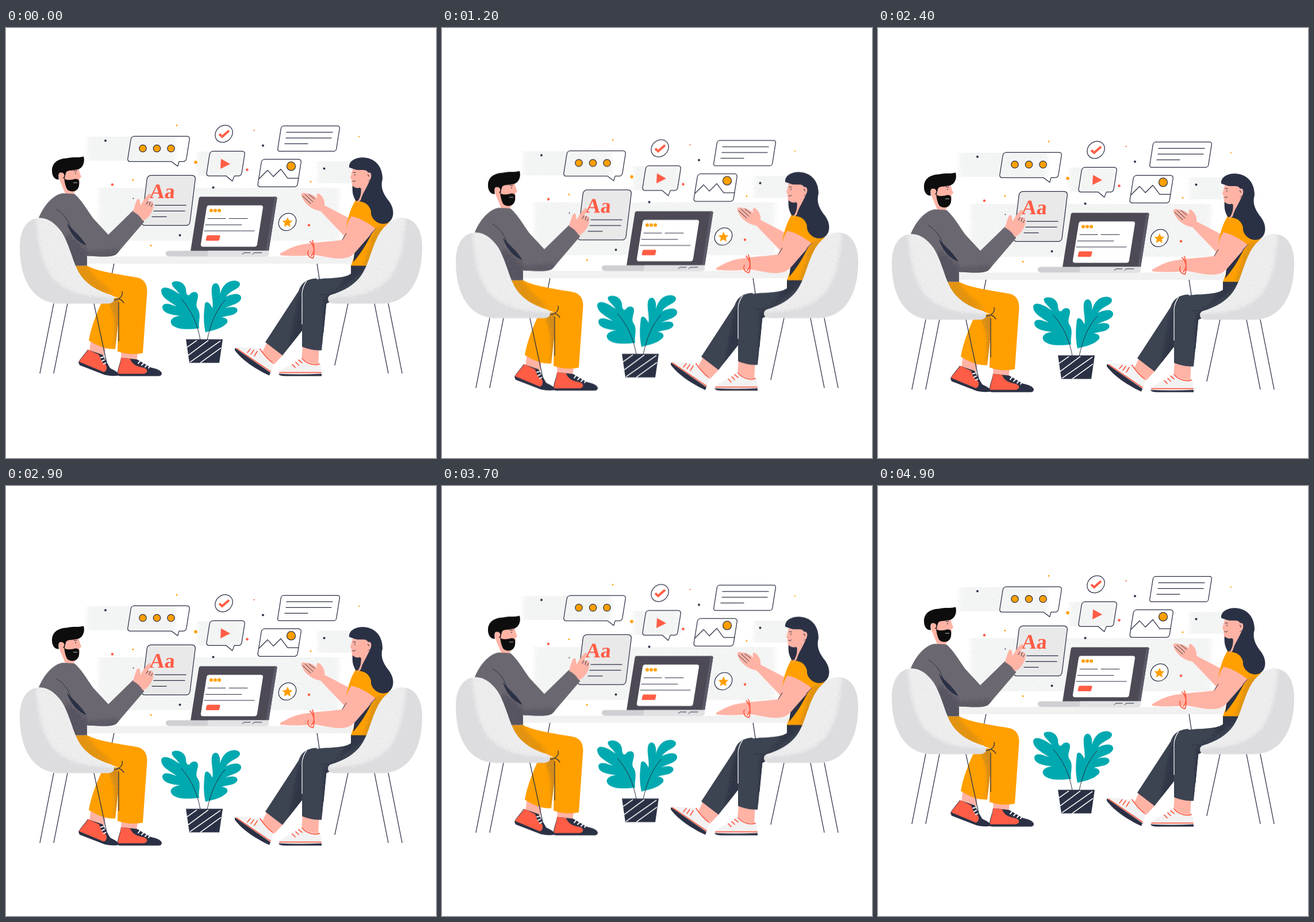
Recreate the animation shown at these times as an HTML page without scripts. Size 748 px wide and 748 px high, loop 5000 ms.

```html
<!DOCTYPE html>
<html lang="en">
<head>
<meta charset="utf-8">
<title>Meeting at the desk</title>
<style>
  @property --tick { syntax: "<number>"; inherits: false; initial-value: 0; }
  html, body { margin: 0; width: 100%; height: 100%; overflow: hidden; background: #fff; }
  /* sine float, 10 poses a second, 6 s wave cut at 5 s */
  #scene {
    display: block; width: 100%; height: 100%; will-change: transform;
    transform: translateY(calc(8.4px + 22px * cos((var(--tick) - 19) * 6deg)));
    animation: float 5s steps(50) -10ms infinite;
  }
  @keyframes float { to { --tick: 50; } }
  .line { fill: none; stroke: #2b3145; stroke-width: 1.25; stroke-linecap: round; stroke-linejoin: round; }
  .thin { stroke-width: 1; }
  .navy { fill: #2b3145; }
  .orange { fill: #ff9f00; }
  .red { fill: #ff5d45; }
  .skin { fill: #ffb3a5; }
  .teal { fill: #00a9b0; }
  .panel { fill: #f2f3f3; filter: url(#fade); }
  .grain { filter: url(#grain); }
  .lace { fill: none; stroke: #fff; stroke-width: 2; stroke-linecap: round; }
  .trim { fill: none; stroke: #ff5d45; stroke-width: 1.8; stroke-linecap: round; }
  .black { fill: #0d0d0d; }
  text { font: bold 36px "Liberation Serif", "Noto Serif", serif; }
</style>
</head>
<body>
<svg id="scene" viewBox="0 0 748 748">
  <defs>
    <filter id="grain" color-interpolation-filters="sRGB">
      <feGaussianBlur in="SourceAlpha" stdDeviation="7" result="soft"/>
      <feTurbulence type="fractalNoise" baseFrequency=".75" numOctaves="2" seed="4" result="noise"/>
      <feComposite in="soft" in2="noise" operator="arithmetic" k2="5" k3="5" k4="-6" result="mask"/>
      <feComposite in="SourceGraphic" in2="mask" operator="in"/>
    </filter>
    <filter id="fade" color-interpolation-filters="sRGB">
      <feGaussianBlur in="SourceAlpha" stdDeviation="9 0" result="soft"/>
      <feTurbulence type="fractalNoise" baseFrequency=".6" numOctaves="2" seed="7" result="noise"/>
      <feComposite in="soft" in2="noise" operator="arithmetic" k2="5" k3="5" k4="-6" result="mask"/>
      <feComposite in="SourceGraphic" in2="mask" operator="in"/>
    </filter>

    <path id="seat" d="M57 331C36 332 24 352 24 382C24 440 48 478 92 480H177C191 480 190 467 183 465C160 458 141 447 130 431C116 411 112 380 97 356C86 340 72 330 57 331Z"/>
    <path id="shirtM" d="M56 333C66 308 82 291 98 288L119 289C130 298 140 315 152 332L178 360L221 318C230 322 237 330 240 338L193 393C187 400 168 398 141 397V414H115L80 380Z"/>
    <path id="legBack" d="M170 470H200L190 559C175 560 158 553 144 544C148 520 158 495 170 470Z"/>
    <path id="legFront" d="M115 414H141C160 425 205 430 230 435C243 439 247 450 245 466L238 566C224 569 207 568 194 563L196 470L130 450Z"/>
    <path id="shirtW" d="M608 300H632C640 320 655 335 674 343L640 414H600L610 385L592 348C594 332 599 315 608 300Z"/>
    <path id="legFar" d="M509 458C515 440 528 437 540 436L560 470L481 570L451 547Z"/>
    <path id="legNear" d="M600 413H640C622 445 590 466 557 480L549 561C538 562 526 559 515 555V480C516 455 520 440 545 437C565 435 590 436 600 428Z"/>
    <path id="armW" d="M601 328C616 331 631 340 643 350L609 389C600 400 590 403 570 401L535 395C515 398 495 397 478 396C474 393 480 391 486 388C500 380 512 377 530 375C550 372 568 372 585 369C591 355 593 338 601 328Z"/>
    <clipPath id="cSeat"><use href="#seat"/></clipPath>
    <clipPath id="cShirtM"><use href="#shirtM"/></clipPath>
    <clipPath id="cBack"><use href="#legBack"/></clipPath>
    <clipPath id="cFront"><use href="#legFront"/></clipPath>
    <clipPath id="cShirtW"><use href="#shirtW"/></clipPath>
    <clipPath id="cNear"><use href="#legNear"/></clipPath>
    <clipPath id="cFar"><use href="#legFar"/></clipPath>

    <g id="chair">
      <path class="line" d="M83 480L59 601M107 480L83 601M153 480L176 587"/>
      <use href="#seat" fill="#dddde0"/>
      <g clip-path="url(#cSeat)">
        <path class="grain" fill="#eeeeef" d="M46 315C50 395 62 440 105 460C130 474 165 474 215 478V430L150 310Z"/>
      </g>
    </g>
  </defs>

  <!-- backdrop -->
  <rect class="panel" x="134" y="189" width="168" height="43"/>
  <rect class="panel" x="326" y="215" width="94" height="43"/>
  <rect class="panel" x="154" y="278" width="432" height="93"/>
  <rect class="panel" x="535" y="232" width="85" height="39"/>
  <g class="navy">
    <circle cx="173" cy="196.500" r="2"/><circle cx="447" cy="205" r="2"/><circle cx="360.500" cy="278" r="2"/>
    <circle cx="553.500" cy="245" r="2"/><circle cx="302.500" cy="361" r="2"/><circle cx="221.500" cy="297" r="1"/>
  </g>
  <g class="orange">
    <circle cx="297" cy="170" r="1.400"/><circle cx="330" cy="234" r="2.800"/><circle cx="221" cy="265" r="1.400"/>
    <circle cx="445" cy="266" r="2"/><circle cx="530" cy="268" r="1.400"/><circle cx="614" cy="189.500" r="1.100"/>
    <circle cx="252" cy="379" r="1.500"/>
  </g>
  <g class="red">
    <circle cx="431.500" cy="178.500" r="1.100"/><circle cx="419.500" cy="247" r="2.300"/>
    <circle cx="185" cy="273" r="2.200"/><circle cx="527" cy="343.500" r="2.200"/>
  </g>

  <!-- floating cards -->
  <g class="line">
    <path transform="translate(218 189) skewX(-9)" d="M5 0H97a5 5 0 0 1 5 5V39a5 5 0 0 1-5 5H90L89 52L77 44H5a5 5 0 0 1-5-5V5a5 5 0 0 1 5-5Z"/>
    <g class="orange"><circle cx="238" cy="210" r="6.200"/><circle cx="262.500" cy="210" r="6.200"/><circle cx="287" cy="210" r="6.200"/></g>
    <rect transform="translate(479 171) skewX(-9)" width="102" height="44" rx="4"/>
    <path d="M488 182H568M487 192H566M485 202H525"/>
    <path transform="translate(355 215) skewX(-9)" d="M5 0H56a5 5 0 0 1 5 5V38a5 5 0 0 1-5 5H49L47 52L35 43H5a5 5 0 0 1-5-5V5a5 5 0 0 1 5-5Z"/>
    <rect transform="translate(445 229) skewX(-9)" width="69" height="48" rx="5" fill="#fff"/>
    <path d="M440 263L455 248L465 259L478 246L490 262H509"/>
    <circle class="orange" cx="496" cy="241" r="7.500"/>
    <ellipse cx="379" cy="184.500" rx="16.200" ry="13.800" transform="rotate(-42 379 184.500)" fill="#fff"/>
    <ellipse cx="489.500" cy="338" rx="16.200" ry="14" transform="rotate(-42 489.500 338)" fill="#fff"/>
    <rect transform="translate(246 257) skewX(-7)" width="84" height="87" rx="6" fill="#e9e9ea"/>
    <path d="M259 309H313M257 319H311M254 329H279"/>
  </g>
  <path d="M371 185L376 189.500L388 179" fill="none" stroke="#ff5d45" stroke-width="4"/>
  <path class="red" d="M374 228L390 237L373 245.500Z"/>
  <path class="orange" d="M490 329.500L492.500 335.500L498.500 336L493.700 340.200L495 346.500L489.300 343.300L483.700 346.500L485 340.200L480.500 336L487 335.500Z"/>
  <text class="red" transform="translate(249 297) skewX(-5)">Aa</text>

  <!-- table and laptop -->
  <path class="line" d="M188 410L180 450M541 410L547 450"/>
  <rect x="137" y="398" width="466" height="12.500" fill="#f1f1f1"/>
  <g transform="translate(336 294) skewX(-9)">
    <rect width="136" height="96" rx="3" fill="#4d4a55"/>
    <path d="M131 0h2a3 3 0 0 1 3 3V96H131Z" fill="#5c5a68"/>
    <rect x="16" y="15" width="98" height="72" rx="4" fill="#fff"/>
  </g>
  <path d="M283 388H457V394Q456 398 451 398H284C276 398 276 388 283 388Z" fill="#d0d0d4"/>
  <path d="M352 388H457V394Q456 398 451 398H350Z" fill="#e2e2e5"/>
  <g class="orange"><circle cx="357" cy="318" r="3"/><circle cx="364" cy="318" r="3"/><circle cx="371" cy="318" r="3"/></g>
  <path class="line thin" d="M351 332H382M388 332H420M347 343H410M345 353.500H432M411 394L414 391.500H425M429 394L432 391.500H445"/>
  <path class="red" d="M351 361H371Q373 361 372.500 363L371 369Q370.500 370.500 369 370.500H349Q347 370.500 347.500 368.500L349 363Q349.500 361 351 361Z"/>

  <!-- plant -->
  <path class="teal" d="M336 523C318 525 300 526 290 518C283 511 287 503 303 501C288 500 272 496 272 486C273 477 285 480 297 485C285 476 270 470 270 457C272 446 291 455 302 464C297 455 286 449 289 443C298 438 311 443 313 455C313 463 316 468 320 464C324 458 335 458 334 468C332 478 329 484 334 490C340 500 334 512 336 523Z"/>
  <path class="teal" d="M347 530C343 512 344 496 346 480C349 474 355 479 359 488C362 478 354 455 360 447C367 440 374 449 372 464C376 450 383 441 396 440C408 440 411 448 401 454C394 458 386 462 383 468C397 461 410 462 409 471C407 480 392 482 381 488C396 483 405 487 402 494C396 502 384 500 375 504C386 504 388 512 382 516C372 525 359 526 347 530Z"/>
  <path class="line thin" d="M338 543C333 515 323 492 305 472M350 543C356 515 365 492 381 474"/>
  <path class="navy" d="M313 542H377L371 583H319Z"/>
  <path d="M315 556L332 544M317 570L352 544M320 582L373 545M338 583L374 557" fill="none" stroke="#fff" stroke-width="1.600"/>

  <!-- man -->
  <g>
    <path class="skin" d="M148 540L174 552L170 574L145 564Z"/>
    <path class="skin" d="M200 560H230L227 580H201Z"/>
    <path class="navy" d="M142 560C137 568 130 574 126 582L128 587L172 604Q185 607 196 605C196 598 187 596 181 592L168 569Z"/>
    <path class="red" d="M143 560C138 568 131 574 127 581L170 599C176 598 177 588 172 585C166 583 164 574 162 569Z"/>
    <path class="lace" d="M165 574L169 573M167 580L171 578M170 585L174 583"/>
    <path class="navy" d="M200 574C199 584 194 592 194 602Q194 606 199 606H265Q271 606 271 601C269 595 260 593 252 591L228 577Z"/>
    <path class="red" d="M200 574C200 584 195 592 195 602H240C249 600 246 592 237 591C225 589 218 583 216 576Z"/>
    <path class="lace" d="M230 584L234 579M236 587L240 583M242 590L246 586M248 592L251 588"/>
    <use href="#legBack" class="orange"/>
    <g clip-path="url(#cBack)"><path class="grain" fill="#d08a1c" d="M176 460H215L205 550L180 575Q192 510 172 475Z"/></g>
    <use href="#legFront" class="orange"/>
    <g clip-path="url(#cFront)"><path class="grain" fill="#e09212" d="M105 405H145C145 425 175 440 200 470L120 465Z"/></g>
    <path class="line" d="M196 545V478M186 474C196 474 204 468 202 459M197 472Q202 474 205 479"/>

    <path class="skin" d="M91 257H124C129 262 131 272 118 288C114 292 103 291 104 288Z"/>
    <path class="skin" d="M102 244H126C127 251 130 256 131 260L126 264V272H104Z"/>
    <path class="black" d="M101 262C107 267 113 264 117 264C121 262 126 263 127 266C128 274 127 281 120 284C111 287 103 281 102 273Z"/>
    <path class="black" d="M80 249C80 234 91 228 106 227C117 224 126 227 135 224C138 235 133 246 122 247C113 249 106 247 104 253L101 265L95 252C91 252 91 257 92 264C85 265 80 258 80 249Z"/>
    <circle class="skin" cx="96.500" cy="257" r="5"/>
    <path class="line thin" d="M121 252V254M118 249H123"/>
    <path fill="#fff" opacity=".5" d="M117 269H124V270.500H117Z"/>
    <path class="skin" d="M92 262L104 291H115C106 284 103 276 101 262Z"/>

    <use href="#shirtM" fill="#6b6770"/>
    <g clip-path="url(#cShirtM)">
      <path class="grain" fill="#565360" d="M100 345L152 388V430H95Z"/>
      <path class="grain" fill="#5c5964" d="M135 384L200 378L215 410H135Z"/>
    </g>
    <path class="navy" d="M106 340C116 352 130 362 140 379C126 374 112 360 106 340Z"/>
    <path class="line thin" d="M88 316C101 324 108 334 113 349M222 319C230 323 236 330 239 337"/>
    <path class="skin" d="M221 320C223 312 225 305 228 299C231 297 233 298 233 302L234 309C238 302 243 293 249 289C252 288 254 290 252 293L247 302C254 301 258 304 256 309C257 314 254 319 252 323C249 328 245 333 238 336Q232 325 221 320Z"/>
    <path class="line thin" d="M247 302L244 307M251 303L249 309M255 307L252 311"/>
  </g>
  <use href="#chair"/>

  <!-- woman -->
  <g>
    <path class="skin" d="M514 292C513 288 516 286 521 288C529 288 537 292 542 297C540 293 540 289 543 288C549 290 556 301 554 309L600 333L588 362L547 319C533 317 518 306 514 292Z"/>
    <path class="line thin" d="M516 293L530 306M520 290L534 303M527 290L537 298"/>
    <path class="skin" d="M455 545L483 568L466 586L442 572Z"/>
    <path class="skin" d="M516 552H545L543 588L514 578Z"/>
    <path fill="#f2f2f3" d="M399 556C410 554 432 561 442 558C448 566 458 579 466 582L460 601Z"/>
    <path class="trim" d="M401 558L460 598M420 565L425 559M426 568L431 561M432 571L437 563"/>
    <path class="navy" d="M398 557L460 600L458 605C436 595 410 578 398 561Z"/>
    <path fill="#f2f2f3" d="M475 600C478 592 503 586 515 573C522 583 538 587 546 583C548 590 549 596 549 604H478Z"/>
    <path class="trim" d="M476 600H548M498 586L503 591M504 582L509 587M509 578L515 583M515 575C522 585 538 588 545 585M442 559C448 568 457 578 464 583"/>
    <path class="navy" d="M474 602Q510 604 549 602V606H486Q475 606 474 602Z"/>

    <use href="#legFar" fill="#3c4351"/>
    <g clip-path="url(#cFar)"><path class="grain" fill="#2f3545" d="M506 455H570V560L480 590Z"/></g>
    <use href="#legNear" fill="#3c4351"/>
    <g clip-path="url(#cNear)"><path class="grain" fill="#2f3545" d="M590 400H660L570 470L562 570H544L548 465Q590 450 590 400Z"/></g>
    <path d="M523 441Q516 450 515 462V516" fill="none" stroke="#fff" stroke-width="1.200"/>
    <path class="line thin" d="M545 465Q555 462 562 467M557 478L552 530"/>

    <use href="#shirtW" class="orange"/>
    <g clip-path="url(#cShirtW)"><path class="grain" fill="#dd9214" d="M640 340H690L645 430H610Z"/></g>
    <path class="navy" d="M643 349C632 362 628 380 604 408C606 398 604 394 609 387Z"/>
    <use href="#armW" class="skin"/>
    <path class="line thin" d="M585 369L592 358M643 350L634 359"/>
    <path class="trim" d="M529 372C536 378 538 392 534 401C527 400 523 394 526 388M533 370C537 380 537 391 531 397"/>

    <path class="navy" d="M597 243C596 231 610 225 624 226C644 228 655 243 655 263C651 277 656 288 664 299C677 314 676 332 665 339C650 347 633 332 635 319C631 306 624 304 615 302C606 301 602 290 603 274L616 250Z"/>
    <path class="skin" d="M603 246C618 250 625 244 630 252C636 250 637 259 633 265C628 265 627 273 620 278C614 282 606 278 602 276L601 264L599 261Z"/>
    <path class="skin" d="M617 274L633 265C627 280 620 288 617 300L609 306C617 297 619 286 617 274Z"/>
    <path class="navy" d="M603 275C607 279 612 280 616 278C619 288 616 297 609 302C603 293 602 283 603 275Z"/>
    <path class="line thin" d="M607 255V257M604 252H608M603 267Q606 269 608 266M629 256Q632 255 631 259"/>
  </g>
  <use href="#chair" transform="matrix(-1 0 0 1 748 0)"/>
</svg>
</body>
</html>
```
